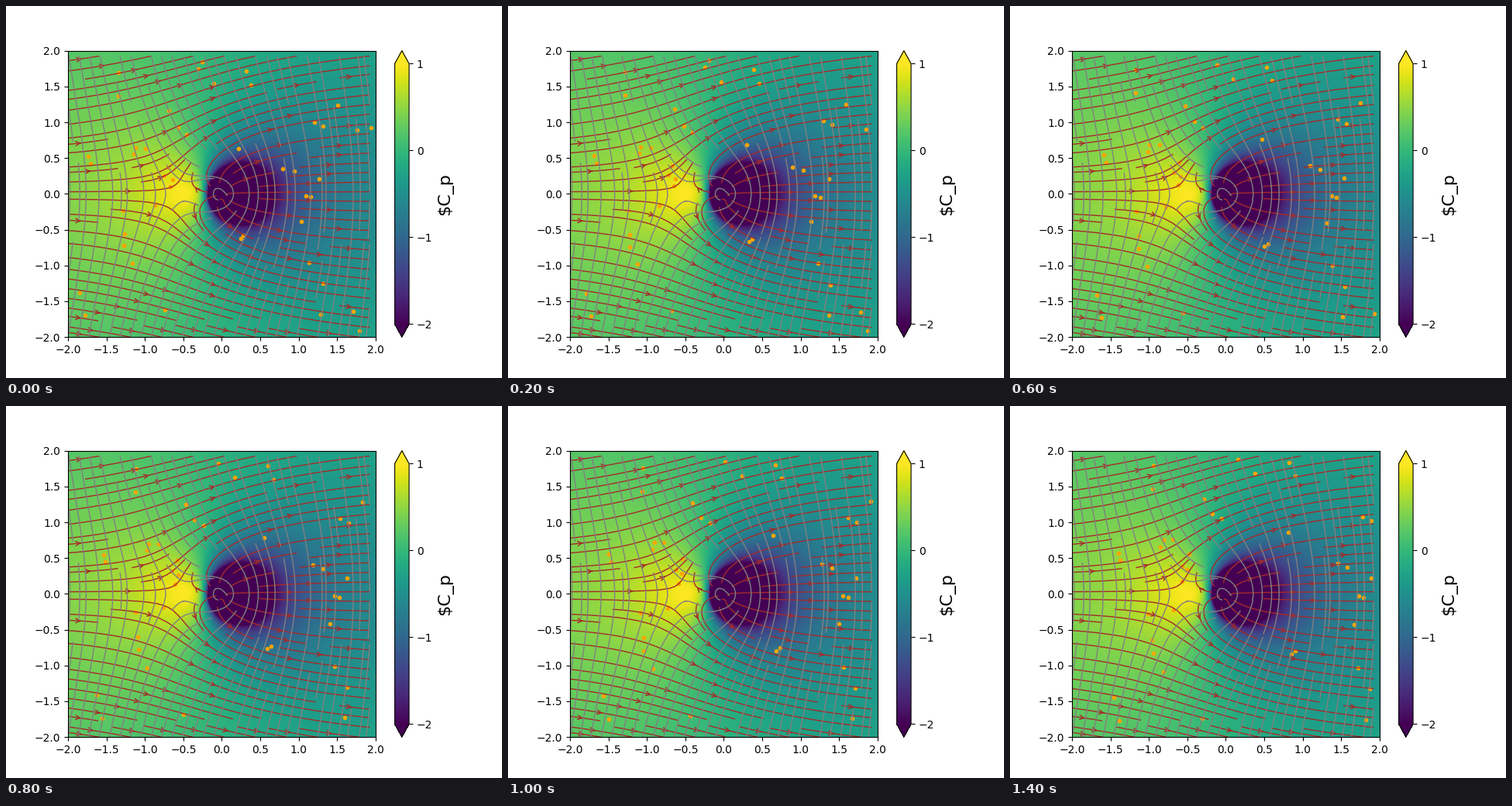
Animation of 640 by 480 pixels, one loop 1500 ms. Source, as a matplotlib script:

```python
import numpy as np
import matplotlib.pyplot as plt
from matplotlib.animation import FuncAnimation

SIZE = 2.0          # half width of the flow domain
STRENGTH = 0.5      # source strength divided by 2 pi
DT = 1 / 30
FRAMES = 15
INTERVAL = 100

# Tracer start positions (x, y)
TRACERS = np.array([
    (-0.256, 1.844), (-0.306, 1.747), (-1.345, 1.693), (-1.34, 1.37),
    (-0.10, 1.54), (0.319, 1.714), (0.384, 1.52), (-0.69, 1.162),
    (1.513, 1.243), (1.21, 1.005), (1.32, 0.951), (1.765, 0.892),
    (1.942, 0.924), (-0.569, 0.924), (-0.453, 0.827), (-1.143, 0.556),
    (-1.123, 0.643), (-0.992, 0.632), (0.213, 0.637), (-1.733, 0.524),
    (-1.703, 0.426), (-0.695, 0.372), (-0.75, 0.253), (-0.644, 0.194),
    (-0.669, 0.10), (0.797, 0.356), (0.939, 0.318), (1.271, 0.205),
    (1.09, -0.028), (1.16, -0.044), (-0.866, -0.158), (-1.284, -0.234),
    (1.039, -0.38), (0.283, -0.585), (0.243, -0.618), (-1.27, -0.726),
    (-1.264, -0.558), (-1.168, -0.97), (1.14, -0.959), (1.312, -1.256),
    (-1.844, -1.381), (-0.735, -1.614), (-1.783, -1.70), (1.291, -1.679),
    (1.705, -1.646), (1.795, -1.906),
])


def velocity(x, y):
    """Uniform stream plus a point source at the origin."""
    r2 = x**2 + y**2
    return 1 + STRENGTH * x / r2, STRENGTH * y / r2


def trace(start, steps):
    """Positions of all tracers at every time step."""
    path = [start]
    for _ in range(steps - 1):
        x, y = path[-1].T
        path.append(path[-1] + DT * np.column_stack(velocity(x, y)))
    return path


def draw_pressure(ax, n=800):
    centres = -SIZE + (np.arange(n) + 0.5) * 2 * SIZE / n
    u, v = velocity(*np.meshgrid(centres, centres))
    return ax.imshow(1 - u**2 - v**2, extent=(-SIZE, SIZE, -SIZE, SIZE),
                     origin="lower", aspect="auto", cmap="viridis",
                     vmin=-2, vmax=1)


def draw_lines(ax):
    grid = np.linspace(-SIZE, SIZE, 1000)[::20]
    u, v = velocity(*np.meshgrid(grid, grid))
    ax.streamplot(grid, grid, u, v, density=1, linewidth=1,
                  color="brown", arrowstyle="->")
    # Equipotentials run at right angles to the flow
    ax.streamplot(grid, grid, -v, u, density=1, linewidth=1,
                  color="gray", arrowstyle="-")


fig, ax = plt.subplots(figsize=(6.4, 4.8), dpi=100)
pressure = draw_pressure(ax)
bar = fig.colorbar(pressure, ax=ax, extend="both")
bar.set_ticks([-2, -1, 0, 1])
bar.set_label("$C_p", fontsize=16)
draw_lines(ax)
dots, = ax.plot([], [], ".", color="orange", markersize=6, zorder=1.5)
ax.set_xlim(-SIZE, SIZE)
ax.set_ylim(-SIZE, SIZE)
ax.set_xticks(np.arange(-2, 2.1, 0.5))
ax.set_yticks(np.arange(-2, 2.1, 0.5))

positions = trace(TRACERS, FRAMES)


def update(frame):
    x, y = positions[frame].T
    inside = (x < 1.945) & (y < 1.89)
    dots.set_data(x[inside], y[inside])
    return dots,


anim = FuncAnimation(fig, update, frames=FRAMES, interval=INTERVAL,
                     repeat=True, repeat_delay=0)
plt.show()
```
